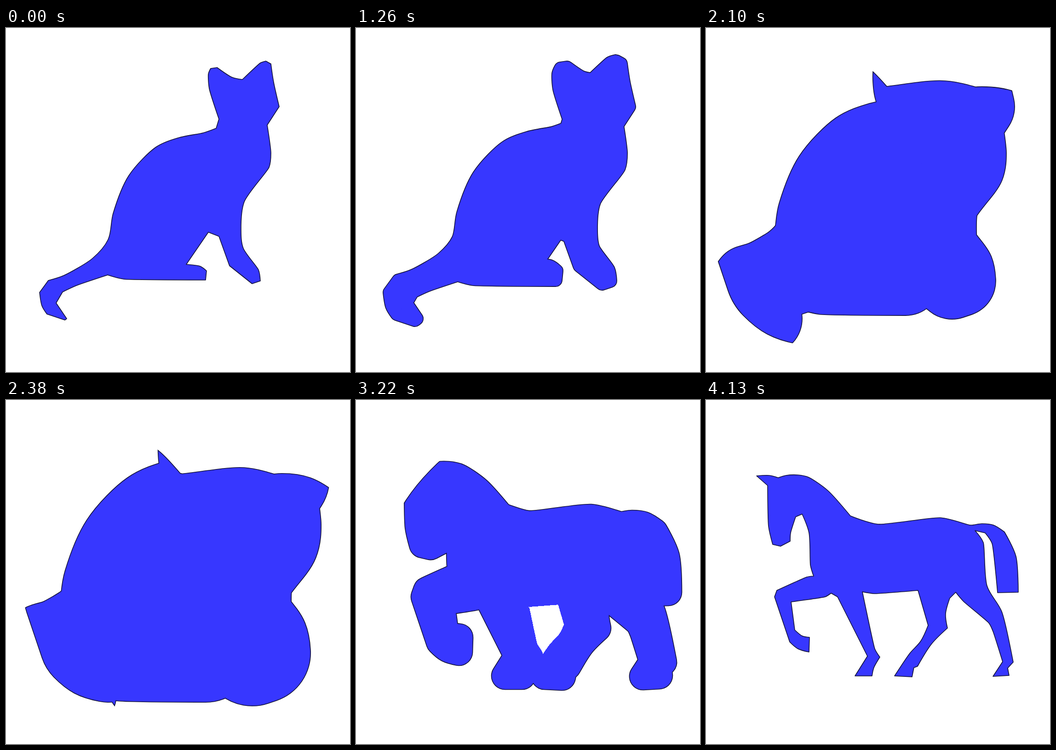
Animation of 748 by 748 pixels, one loop 4.83 s. Source, as an HTML page with a canvas:

```html
<!DOCTYPE html>
<html lang="en">
<head>
<meta charset="utf-8">
<title>Cat to horse</title>
<style>
  html, body { margin: 0; width: 100%; height: 100%; overflow: hidden; background: #fff; }
  canvas { display: block; width: 100vw; height: 100vh; }
</style>
</head>
<body>
<canvas id="view" width="748" height="748"></canvas>
<script>
const SIZE = 748, HOLD = 700, STEP = 70, STEPS = 50, LOOP = 4830;
const REACH = 218.5; // Hausdorff distance between the two outlines
const BLUE = '#3737ff', INK = '#12123a', HALF_LINE = 0.8;
const SHARP = Math.PI / 6; // stronger turns stay corners, weaker ones are rounded

// Closed path through a few key points
function outline(...parts) {
  const points = parts.join(' ').split(' ').map(p => p.split(',').map(Number));
  const count = points.length;
  const knots = points.map(([x, y], i) => {
    const [px, py] = points[(i + count - 1) % count];
    const [nx, ny] = points[(i + 1) % count];
    const before = Math.atan2(y - py, x - px);
    const delta = Math.atan2(ny - y, nx - x) - before;
    const turn = Math.atan2(Math.sin(delta), Math.cos(delta));
    const reach = Math.min(Math.hypot(x - px, y - py), Math.hypot(nx - x, ny - y)) / 3;
    const handle = Math.abs(turn) < SHARP ? reach : 0;
    const angle = before + turn / 2;
    return { x, y, hx: handle * Math.cos(angle), hy: handle * Math.sin(angle) };
  });
  const path = new Path2D();
  path.moveTo(knots[0].x, knots[0].y);
  knots.forEach((p, i) => {
    const q = knots[(i + 1) % count];
    path.bezierCurveTo(p.x + p.hx, p.y + p.hy, q.x - q.hx, q.y - q.hy, q.x, q.y);
  });
  path.closePath();
  return path;
}

const cat = outline(
  '442,132 440,100 445,88 459,86 491,107 514,112 553,76 565,72 576,78 582,118 594,171 568,211',
  '576,272 572,303 518,378 511,440 516,479 549,526 553,550 535,556 486,517 463,453 440,444',
  '392,514 422,518 436,528 434,548 256,546 221,537',
  '153,560 123,574 109,598 132,632 128,635 89,622 78,604 73,575 92,549 126,538 188,501 222,460',
  '233,403 267,321 326,259 374,239 429,228 457,218 463,198'
);

const horse = outline(
  '110,165 137,164 157,169 174,164 200,163 223,168 265,197 314,252 374,270 510,256 575,272',
  '600,269 625,272 649,287 674,340 679,418 634,419 622,312 607,289 585,284',
  '603,310 611,404 643,460 668,570 656,583 659,599 624,601 645,569 624,503 615,485 560,438 543,418',
  '530,431 521,465 525,496 490,531 460,579 452,582 448,602 410,600 443,551 467,524 483,490 461,414',
  '366,421 340,417 367,541 378,559 365,582 361,600 324,600 351,557 286,428 272,420',
  '259,428 185,439 193,500 209,513 225,516 224,548 200,541 182,526 149,428 154,414 219,385 234,383',
  '227,359 224,289 209,248 195,254 184,289 183,307 162,318 145,314 136,275 134,186'
);

function layer(canvas) {
  canvas.width = canvas.height = SIZE;
  const ctx = canvas.getContext('2d', { willReadFrequently: true });
  ctx.lineJoin = ctx.lineCap = 'round';
  return ctx;
}
const view = layer(document.getElementById('view'));
const shape = layer(document.createElement('canvas'));
const other = layer(document.createElement('canvas'));

function grow(ctx, path, radius, color) {
  ctx.clearRect(0, 0, SIZE, SIZE);
  ctx.fillStyle = ctx.strokeStyle = color;
  ctx.fill(path);
  if (radius > 0) {
    ctx.lineWidth = 2 * radius;
    ctx.stroke(path);
  }
}

// Intersection of the two grown outlines, left in `shape`
function overlap(catRadius, horseRadius, color) {
  grow(shape, cat, catRadius, color);
  grow(other, horse, horseRadius, color);
  shape.globalCompositeOperation = 'destination-in';
  shape.drawImage(other.canvas, 0, 0);
  shape.globalCompositeOperation = 'source-over';
}

// Empty pixels that cannot be reached from the corner
function findHoles(ctx) {
  const data = ctx.getImageData(0, 0, SIZE, SIZE).data;
  const open = new Uint8Array(SIZE * SIZE);
  for (let i = 0; i < open.length; i++) open[i] = data[4 * i + 3] < 220 ? 1 : 0;
  const stack = [0];
  open[0] = 0;
  while (stack.length) {
    const i = stack.pop(), x = i % SIZE, y = (i - x) / SIZE;
    for (let ny = Math.max(0, y - 1); ny <= Math.min(SIZE - 1, y + 1); ny++)
      for (let nx = Math.max(0, x - 1); nx <= Math.min(SIZE - 1, x + 1); nx++) {
        const n = ny * SIZE + nx;
        if (open[n]) { open[n] = 0; stack.push(n); }
      }
  }
  const holes = [];
  open.forEach((hole, i) => { if (hole) holes.push([i % SIZE, Math.floor(i / SIZE)]); });
  return holes;
}

function render(step) {
  const u = step / STEPS;
  const mix = u < 0.5 ? 2 * u * u : 1 - 2 * (1 - u) ** 2;
  const a = mix * REACH, b = (1 - mix) * REACH;
  const stamp = () => view.drawImage(shape.canvas, 0, 0);

  view.fillStyle = '#fff';
  view.fillRect(0, 0, SIZE, SIZE);

  if (Math.min(a, b) < HALF_LINE) {
    const near = a < b ? cat : horse;
    grow(shape, near, 0, BLUE);
    stamp();
    view.strokeStyle = INK;
    view.lineWidth = 2 * HALF_LINE;
    view.stroke(near);
    return;
  }

  overlap(a + HALF_LINE, b + HALF_LINE, INK);
  stamp();
  overlap(a - HALF_LINE, b - HALF_LINE, BLUE);
  stamp();

  // Only the outer boundary carries a line
  overlap(a, b, BLUE);
  const holes = findHoles(shape);
  view.fillStyle = BLUE;
  for (const [x, y] of holes) view.fillRect(x - 2, y - 2, 5, 5);
  view.fillStyle = '#fff';
  for (const [x, y] of holes) view.fillRect(x, y, 1, 1);
}

let shown = -1;
function tick() {
  const t = performance.now() % LOOP;
  const step = t < HOLD ? 0 : Math.min(STEPS, Math.floor((t - HOLD) / STEP) + 1);
  if (step !== shown) render(shown = step);
  requestAnimationFrame(tick);
}
tick();
</script>
</body>
</html>
```
